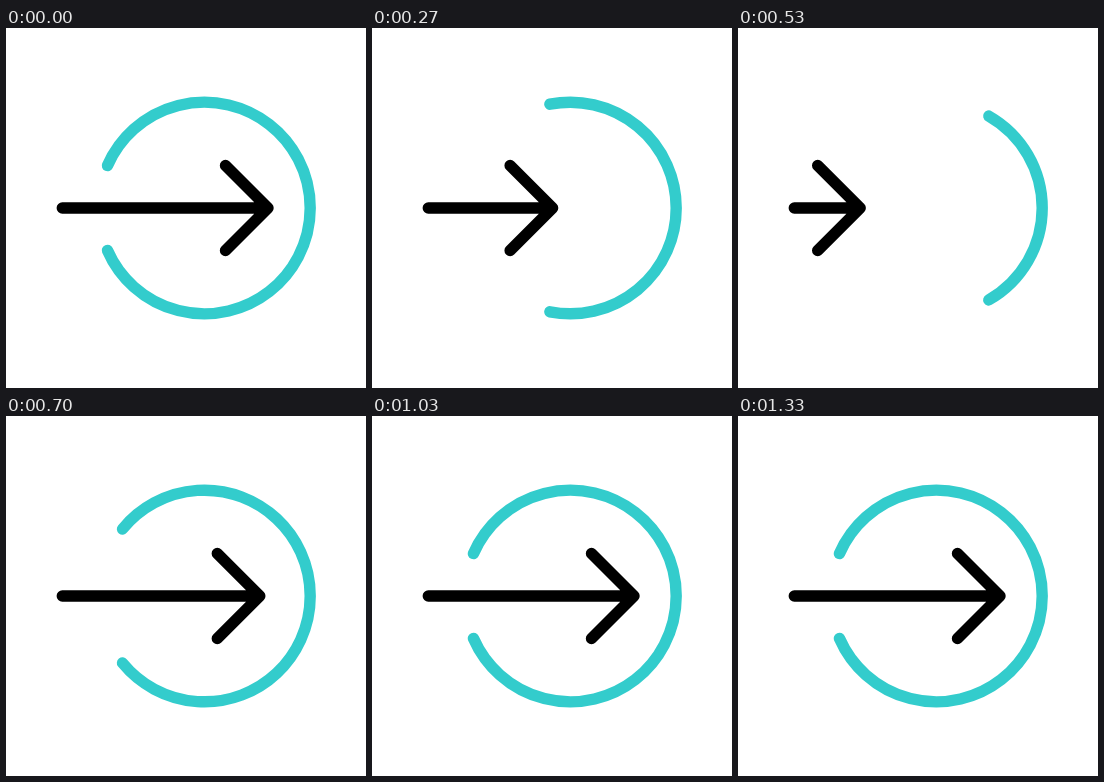
These frames come from a looping animation (360x360 px, 2 s). An HTML page:

```html
<!DOCTYPE html>
<html lang="en">
<head>
<meta charset="utf-8">
<title>Arrow into circle</title>
<style>
  html, body { margin: 0; height: 100%; overflow: hidden; background: #fff; }
  svg { display: block; width: 100vw; height: 100vh; }
  path { fill: none; stroke-width: 11.4; stroke-linecap: round; stroke-linejoin: round; }
</style>
</head>
<body>
<svg viewBox="0 0 360 360">
  <path id="ring" stroke="#33cccc"/>
  <path id="arrow" stroke="#000"/>
</svg>
<script>
const LOOP = 2000, STEP = 1000 / 30;
const CX = 198.4, CY = 180, R = 105.8;

// Keys are [step, value]: half angle of the ring in degrees, x of the arrow tip.
const ringKeys = [[0, 156.4], [15, 56], [23, 156.4]];
const tipKeys = [[0, 262], [15, 114], [22, 262], [26, 200.4], [31, 262], [35, 240], [40, 262]];

const ring = document.getElementById('ring');
const arrow = document.getElementById('arrow');

const ease = u => u * u * (3 - 2 * u);

function valueAt(keys, step) {
  const next = keys.findIndex(([at]) => at > step);
  if (next < 0) return keys[keys.length - 1][1];
  const [t0, a] = keys[next - 1], [t1, b] = keys[next];
  return a + (b - a) * ease((step - t0) / (t1 - t0));
}

function draw(ms) {
  const step = Math.floor((ms % LOOP + 3.4) / STEP);
  const half = valueAt(ringKeys, step);
  const angle = half * Math.PI / 180;
  const x = CX + R * Math.cos(angle), dy = R * Math.sin(angle);
  ring.setAttribute('d', `M${x} ${CY - dy}A${R} ${R} 0 ${half > 90 ? 1 : 0} 1 ${x} ${CY + dy}`);

  const tip = valueAt(tipKeys, step);
  arrow.setAttribute('d', `M56.3 ${CY}H${tip}m-42.5 -42.5l42.5 42.5l-42.5 42.5`);
}

const start = performance.now();
function tick() {
  draw(performance.now() - start);
  requestAnimationFrame(tick);
}
tick();
</script>
</body>
</html>
```
